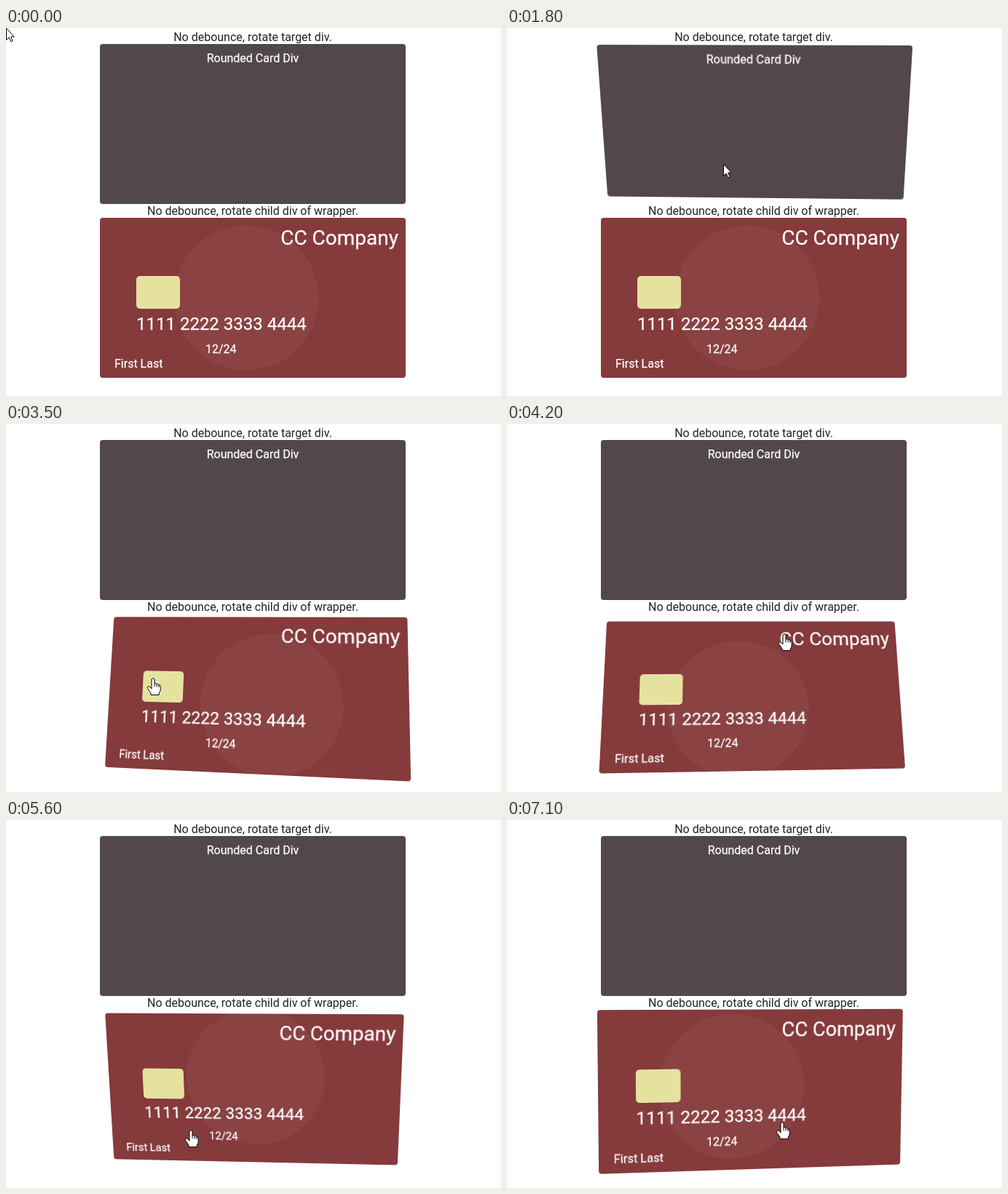
Animation, 680 px wide and 506 px high, one loop 7200 ms. Source, as an HTML page:

```html
<!DOCTYPE html>
<html lang="en">
<head>
<meta charset="utf-8">
<title>Card tilt</title>
<style>
html, body { margin: 0; width: 100%; height: 100%; overflow: hidden; background: #fff; }
#stage { position: relative; width: 680px; height: 506px; overflow: hidden; font: 16px Roboto, sans-serif; }
svg { position: absolute; left: 0; top: 0; }
svg.card { left: 129px; border-radius: 4px; overflow: hidden; }
#plain { top: 22px; background: #524849; }
#credit { top: 261px; background: #853a3c; }
.card text { fill: #fff; stroke: #fff; stroke-width: .25px; }
.label { fill: #222; }
.mid { text-anchor: middle; }
.cursor { fill: #fff; stroke: #000; stroke-linejoin: round; }
</style>
</head>
<body>
<div id="stage">
  <svg width="680" height="506">
    <text class="label mid" x="339" y="18">No debounce, rotate target div.</text>
    <text class="label mid" x="339" y="257">No debounce, rotate child div of wrapper.</text>
  </svg>
  <svg class="card" id="plain" width="420" height="220">
    <text class="mid" x="210" y="25">Rounded Card Div</text>
  </svg>
  <svg class="card" id="credit" width="420" height="220">
    <circle id="glow" cx="201" cy="110" r="99.5" fill="#8a4242"/>
    <rect x="50" y="80" width="60" height="45" rx="5" fill="#e5e2a0"/>
    <text x="410" y="37" font-size="28" text-anchor="end">CC Company</text>
    <text x="50" y="154" font-size="24">1111 2222 3333 4444</text>
    <text x="145" y="186">12/24</text>
    <text x="20" y="206">First Last</text>
  </svg>
  <svg width="680" height="506">
    <path class="cursor" id="arrow" d="M.5 .5V16.5L4.2 13L6.8 18.8L9.2 17.7L6.7 12H11.3Z"/>
    <path class="cursor" id="hand" d="M-2 2Q0-1 2 2V8Q4 6.6 5 8.8Q7.2 7.6 8 10Q10.2 9.2 10.2 11.8V16Q10.2 19 8.2 21V23.5H-3V21L-7.5 14.5Q-8 11 -5 12L-2 15ZM2 8V12M5 9V12.5M8 10V13"/>
  </svg>
</div>
<script>
const LOOP = 7200, STEP = 100, SWITCH = 3050;
const CX = 339, HALF_W = 210, HALF_H = 110;

// The cursor circles each card and the tilt trails behind it.
// time, tilt direction in degrees, tilt amount, cursor lead in degrees, cursor reach
const plainTour = [
  [0, -143.4, 0, 0, 2.01],
  [450, -140, 0, 0, 1.2],
  [1000, -127, .318, 12, .42],
  [2600, 322.5, .291, 16.5, .65],
  [SWITCH, 440, 0, 20, 1.05]
];
const creditTour = [
  [SWITCH, -110, 0, 10, 1.15],
  [3500, -137, .285, -26, .68],
  [4800, -21.5, .297, 21.5, .87],
  [5600, 108, .254, 21, .64],
  [6800, 330, .28, 30, .65],
  [7100, 388, .143, 37, .44]
];

const $ = id => document.getElementById(id);
const polar = (deg, r) => [r * Math.cos(deg * Math.PI / 180), r * Math.sin(deg * Math.PI / 180)];

function follow(tour, t) {
  t = Math.min(Math.max(t, tour[0][0]), tour.at(-1)[0]);
  const i = Math.max(1, tour.findIndex(row => row[0] >= t));
  const a = tour[i - 1], b = tour[i], u = (t - a[0]) / (b[0] - a[0]);
  const [, turn, tilt, lead, reach] = a.map((v, n) => v + (b[n] - v) * u);
  const [right, down] = polar(turn, tilt);
  return { x: -down, y: right, tilt, mouse: polar(turn + lead, reach) };
}

function lean(el, { x, y, tilt }, extra = '') {
  el.style.transform = tilt < 1e-4 ? 'none' :
    `perspective(1000px) ${extra} rotate3d(${x}, ${y}, 0, ${Math.asin(tilt)}rad)`;
}

function draw(t) {
  const plain = follow(plainTour, t), credit = follow(creditTour, t);
  const { x, y } = credit;
  const skew = -y * (.135 + .4 * x);
  const shrink = 1 - .047 * Math.sin(Math.PI * Math.max(0, t - 3500) / 3600);

  lean($('plain'), plain);
  lean($('credit'), credit, `skewY(${skew}rad) scale(${shrink})`);
  $('glow').setAttribute('cx', 201 - 162 * y);
  $('glow').setAttribute('cy', 110 + 70 * x);

  const onCredit = t >= SWITCH;
  const [u, v] = (onCredit ? credit : plain).mouse;
  const mx = Math.round(CX + HALF_W * u);
  const my = Math.round((onCredit ? 371 : 132) + HALF_H * v);
  const over = onCredit && Math.abs(u) < 1 && Math.abs(v) < 1;
  for (const [id, shown] of [['arrow', !over], ['hand', over]]) {
    $(id).setAttribute('transform', `translate(${mx} ${my})`);
    $(id).style.display = shown ? '' : 'none';
  }
}

const start = performance.now();
function tick() {
  const t = (performance.now() - start) % LOOP;
  draw(Math.floor(t / STEP) * STEP);
  requestAnimationFrame(tick);
}
tick();
</script>
</body>
</html>
```
